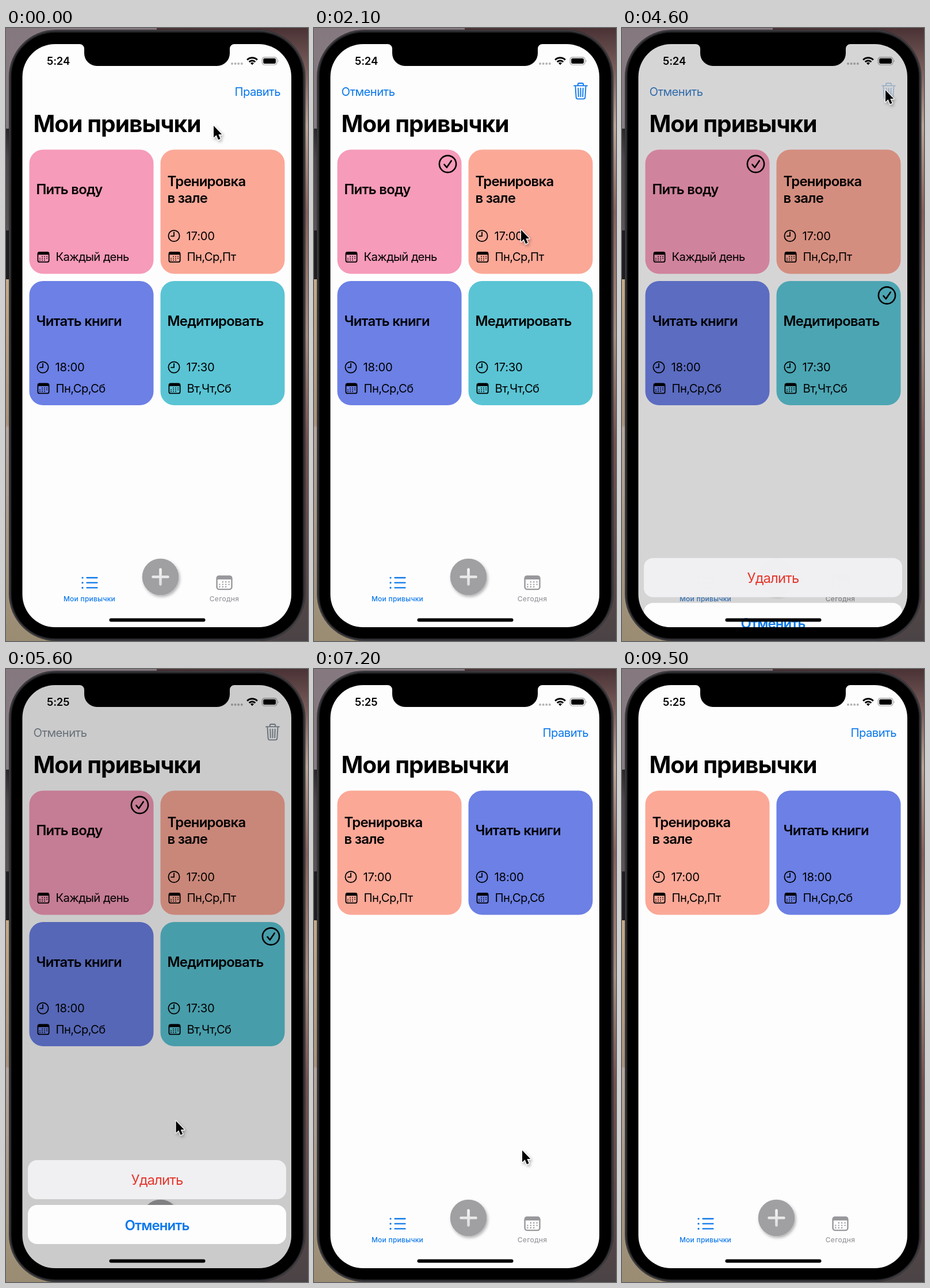
An HTML page for the animation above (9600 ms loop, 525 px wide and 1066 px high).

```html
<!DOCTYPE html>
<html lang="ru">
<head>
<meta charset="utf-8">
<title>Мои привычки</title>
<style>
  html, body { margin: 0; width: 100%; height: 100%; overflow: hidden; background: #000; }
  svg { display: block; width: 525px; height: 1066px; --tint: #0a78ea; }
  text { font-family: Inter, "Open Sans", sans-serif; white-space: pre; }
  .body { font-size: 20.3px; letter-spacing: -.029em; }
  .hour { font-size: 20.3px; letter-spacing: -.01em; }
  .name { font-size: 23.9px; font-weight: 600; letter-spacing: -.03em; }
  .title { font-size: 40.6px; font-weight: 700; letter-spacing: -.024em; }
  .clock { font-size: 18.5px; font-weight: 600; letter-spacing: -.01em; }
  .tab { font-size: 12px; font-weight: 500; letter-spacing: .02em; text-anchor: middle; }
  .row { font-size: 23.9px; letter-spacing: -.035em; text-anchor: middle; }
  .line { fill: none; stroke-linecap: round; stroke-linejoin: round; }
  .tint { fill: var(--tint); }
  .tintLine { stroke: var(--tint); }
</style>
</head>
<body>
<svg viewBox="0 0 525 1066">
  <defs>
    <linearGradient id="leftWall" x2="0" y2="1">
      <stop offset="0" stop-color="#85797f"/><stop offset=".164" stop-color="#857b80"/>
      <stop offset=".164" stop-color="#2a2729"/><stop offset=".21" stop-color="#4a4548"/>
      <stop offset=".33" stop-color="#5a5356"/><stop offset=".33" stop-color="#1f1d20"/>
      <stop offset=".41" stop-color="#1f1d20"/><stop offset=".41" stop-color="#c2aa88"/>
      <stop offset=".648" stop-color="#a8937d"/><stop offset=".652" stop-color="#b5a69d"/>
      <stop offset="1" stop-color="#9a8c72"/>
    </linearGradient>
    <linearGradient id="rightWall" x2="0" y2="1">
      <stop offset="0" stop-color="#4a3235"/><stop offset=".07" stop-color="#7a5f5c"/>
      <stop offset=".16" stop-color="#b9a596"/><stop offset=".3" stop-color="#86605a"/>
      <stop offset=".5" stop-color="#a58c7d"/><stop offset=".67" stop-color="#74504d"/>
      <stop offset="1" stop-color="#4a4345"/>
    </linearGradient>
    <linearGradient id="plusFill" x2="0" y2="1">
      <stop offset="0" stop-color="#f4f4f4"/><stop offset="1" stop-color="#dedee0"/>
    </linearGradient>
    <filter id="soft" x="-40%" y="-40%" width="180%" height="180%">
      <feDropShadow dx="2" dy="3" stdDeviation="2.4" flood-opacity=".3"/>
    </filter>
    <clipPath id="screen"><rect x="28.5" y="28" width="467.5" height="1014" rx="57"/></clipPath>
    <g id="calendar">
      <rect x="-9.6" y="-8.4" width="19.2" height="17" rx="3" fill="none" stroke="currentColor" stroke-width="1.8"/>
      <path d="M-10-4V-6q0-3 3-3H7q3 0 3 3v2z" fill="currentColor"/>
      <path class="line" d="M-2-.9H6.1M-6 2.3H6.1M-6 5.400H2.1" stroke="currentColor" stroke-width="1.800" stroke-dasharray="0 4"/>
    </g>
    <g id="watch" class="line" stroke="#000" stroke-width="1.8">
      <circle r="9.6"/><path d="M0-6.4V.4H-5"/>
    </g>
    <g id="check" class="line" stroke="#000" stroke-width="2.6">
      <circle r="14.6"/><path d="M-6 .8L-1.7 6 6.2-5.6"/>
    </g>
  </defs>

  <rect width="262" height="1066" fill="url(#leftWall)"/>
  <rect x="262" width="263" height="1066" fill="url(#rightWall)"/>
  <rect x="5" y="3" width="515.5" height="1063" rx="82" fill="#242326"/>
  <rect x="6.5" y="4.5" width="512.5" height="1060" rx="80" fill="none" stroke="#464549" stroke-width="1.4"/>
  <rect x="9.5" y="8" width="506.5" height="1053.5" rx="76"/>

  <g clip-path="url(#screen)">
    <rect x="28" y="28" width="469" height="1014" fill="#fefdfe"/>
    <g id="status">
      <text id="time" class="clock" x="71" y="64.3">5:24</text>
      <path class="line" d="M393 62h18" stroke="#b4b3b6" stroke-width="4" stroke-dasharray="0 5.6"/>
      <path d="M419.2 55.4a12.4 12.4 0 0 1 17.6 0M422.7 59a7.5 7.5 0 0 1 10.6 0" fill="none" stroke="#000" stroke-width="2.9"/>
      <path d="M428 64.3l-3-3.2a4.4 4.4 0 0 1 6 0z"/>
      <rect x="445.3" y="50.8" width="25.6" height="13.2" rx="4" fill="none" stroke="#98979a" stroke-width="1.2"/>
      <rect x="447.2" y="52.7" width="21.8" height="9.4" rx="2.3"/>
      <path d="M472.6 55.2q2.2 2.2 0 4.4z" fill="#98979a"/>
    </g>

    <text id="edit" class="body tint" x="477" y="118" text-anchor="end">Править</text>
    <g id="tools">
      <text class="body tint" x="47.5" y="118">Отменить</text>
      <g id="trash" class="line tintLine" stroke-width="1.9">
        <path d="M452 100.4h23M458.8 100v-2q0-2 2-2h5.4q2 0 2 2v2M454.4 100.8l1.3 20q.2 2.6 2.8 2.6h10q2.6 0 2.8-2.6l1.3-20M459.3 104.8l.5 14.4M463.5 104.8v14.4M467.7 104.8l-.5 14.4"/>
      </g>
    </g>
    <text class="title" x="47.5" y="180.5">Мои привычки</text>
    <g id="cards"></g>

    <g class="line tintLine" stroke-width="2.3">
      <path d="M140.500 956H158.500M140.500 964.700H158.500M140.500 973.400H158.500"/>
      <path d="M133 956h.01M133 964.700h.01M133 973.400h.01" stroke-width="3.2"/>
    </g>
    <text class="tab tint" x="145" y="996.5">Мои привычки</text>
    <use href="#calendar" transform="translate(379.5 964.500) scale(1.35)" color="#99989c"/>
    <text class="tab" x="379.5" y="996.5" fill="#99989c">Сегодня</text>
    <circle cx="268.5" cy="954.5" r="31.800" fill="#a09fa2" filter="url(#soft)"/>
    <path class="line" d="M255.500 954.500h26M268.500 941.500v26" stroke="url(#plusFill)" stroke-width="4.6"/>

    <rect id="dim" x="28" y="28" width="469" height="1014"/>
    <g id="sheet">
      <rect x="38" y="854" width="449" height="68" rx="16" fill="#f1f0f3" fill-opacity=".985"/>
      <text class="row" x="262.5" y="897" fill="#e5382d">Удалить</text>
      <rect x="38" y="932" width="449" height="68" rx="16" fill="#fefdfe"/>
      <text class="row" x="262.5" y="976" fill="#0a78ea" font-weight="600">Отменить</text>
    </g>
    <rect x="179.5" y="1026.500" width="167" height="6" rx="3"/>
  </g>
  <path d="M128 26.500v1.500a8 8 0 0 1 8 8v8a22 22 0 0 0 22 22h209a22 22 0 0 0 22-22v-8a8 8 0 0 1 8-8v-1.500z"/>

  <g id="cursor" filter="url(#soft)">
    <path d="M1 2V22.500L5.700 18.200 9 26.300 12.600 24.800 9.300 17H15.300z" stroke="#fff" stroke-width="2.4" paint-order="stroke" stroke-linejoin="round"/>
  </g>
</svg>

<script>
const LOOP = 9600, STEP = 100;
const $ = id => document.getElementById(id);

const slots = [[40.5, 211.5], [268.5, 211.5], [40.5, 440], [268.5, 440]];
// after: slot once the marked cards are gone; mark: when the card gets its tick
const habits = [
  { name: ['Пить воду'], days: 'Каждый день', fill: '#f69bba', mark: 1600 },
  { name: ['Тренировка', 'в зале'], at: '17:00', days: 'Пн,Ср,Пт', fill: '#fba897', after: 0 },
  { name: ['Читать книги'], at: '18:00', days: 'Пн,Ср,Сб', fill: '#6c80e5', after: 1 },
  { name: ['Медитировать'], at: '17:30', days: 'Вт,Чт,Сб', fill: '#5ac4d4', mark: 2700 }
];
const when = { edit: 800, press: 4300, open: 4400, minute: 5500, close: 6400, remove: 6700 };

// time, x, y of the pointer tip
const path = [
  [0, 360, 168], [500, 440, 104], [800, 440, 104], [1400, 185, 320], [1700, 190, 322],
  [2100, 359, 349], [2500, 385, 535], [2900, 385, 535], [3800, 436, 120], [4200, 457, 106],
  [4900, 457, 106], [5800, 271, 882], [6800, 271, 882], [7200, 361, 835], [7700, 535, 745]
];

function cardMarkup({ name, at, days, fill }) {
  const first = name.length > 1 ? 63.5 : 77.5;
  const lines = name.map((s, i) => `<text class="name" x="12" y="${first + i * 28.5}">${s}</text>`).join('');
  const hour = at ? `<use href="#watch" x="23.5" y="150"/><text class="hour" x="45" y="157.3">${at}</text>` : '';
  return `<g><rect width="216" height="216" rx="24" fill="${fill}"/>${lines}${hour}
    <use href="#calendar" x="24.5" y="186.8"/><text class="body" x="46" y="193.8">${days}</text>
    <use class="mark" href="#check" x="192" y="25"/></g>`;
}
$('cards').innerHTML = habits.map(cardMarkup).join('');
habits.forEach((h, i) => {
  h.el = $('cards').children[i];
  h.tick = h.el.querySelector('.mark');
});

const span = (t, from, length) => Math.min(1, Math.max(0, (t - from) / length));
const mix = (a, b, k) => a + (b - a) * k;
const out = (k, power = 2) => 1 - (1 - k) ** power;
const smooth = k => k * k * (3 - 2 * k);
const show = (el, on) => el.setAttribute('visibility', on ? 'visible' : 'hidden');
const move = (el, x, y) => el.setAttribute('transform', `translate(${x} ${y})`);

function drawCursor(t) {
  const i = path.findIndex(p => p[0] > t);
  show($('cursor'), i > 0);
  if (i < 1) return;
  const [t0, x0, y0] = path[i - 1], [t1, x1, y1] = path[i];
  const k = smooth(span(t, t0, t1 - t0));
  move($('cursor'), mix(x0, x1, k), mix(y0, y1, k));
}

function drawCards(t) {
  const k = smooth(span(t, when.remove, 300));
  habits.forEach((h, i) => {
    const [x, y] = slots[i], [nx, ny] = slots[h.after ?? i];
    move(h.el, mix(x, nx, k), mix(y, ny, k));
    h.el.setAttribute('opacity', h.mark ? 1 - k : 1);
    show(h.tick, h.mark && t >= h.mark && t < when.remove);
  });
}

function drawSheet(t) {
  const rise = span(t, when.open, 500), fall = span(t, when.close, 580);
  const up = out(rise) * (1 - out(fall));
  const shade = out(rise, 3) * (1 - fall);
  move($('sheet'), 0, 188 * (1 - up));
  show($('sheet'), up > 0);
  $('dim').setAttribute('opacity', .2 * shade);
  const grey = .9 * rise * (1 - fall);
  const rgb = [10, 120, 234].map(c => Math.round(mix(c, 142, grey)));
  $('cards').ownerSVGElement.style.setProperty('--tint', `rgb(${rgb})`);
}

function draw(t) {
  const editing = t >= when.edit && t < when.remove;
  show($('edit'), !editing);
  show($('tools'), editing);
  $('trash').setAttribute('opacity', t >= when.press && t < when.open + 500 ? .35 : 1);
  $('time').textContent = t < when.minute ? '5:24' : '5:25';
  drawCards(t);
  drawSheet(t);
  drawCursor(t);
}

function tick() {
  draw(Math.floor(performance.now() % LOOP / STEP) * STEP);
  requestAnimationFrame(tick);
}
tick();
</script>
</body>
</html>
```
